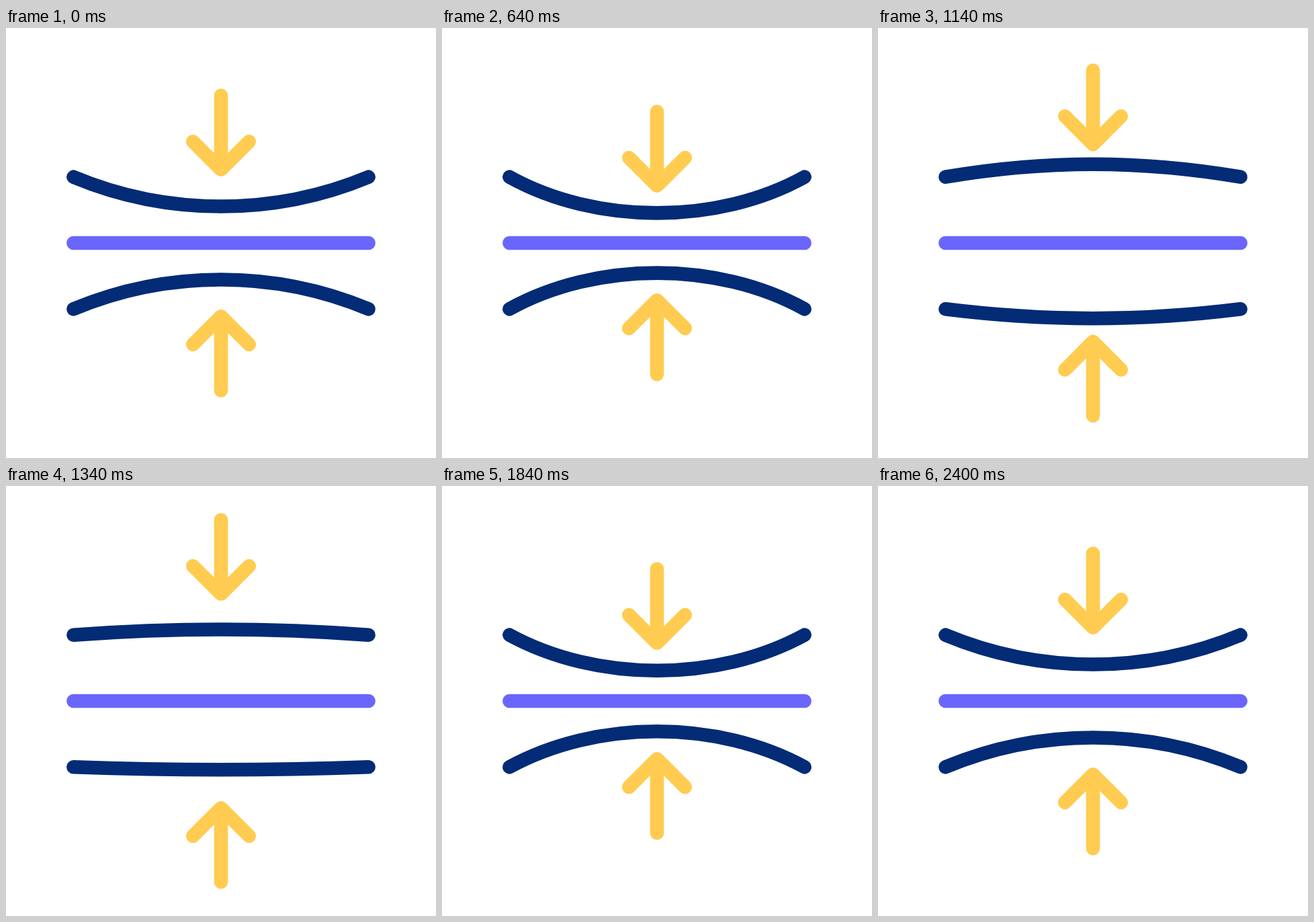
An HTML page with a canvas that plays this animation: 640 px wide and 640 px high, repeating every 3000 ms.

```html
<!DOCTYPE html>
<html lang="en">
<head>
<meta charset="utf-8">
<title>Compress and expand</title>
<style>
  html, body { margin: 0; width: 100%; height: 100%; overflow: hidden; background: #fff; }
  canvas { display: block; }
</style>
</head>
<body>
<canvas id="stage" width="640" height="640"></canvas>
<script>
const ctx = document.getElementById('stage').getContext('2d');
const LOOP = 3000;
const CENTER = 320, LEFT = 100.4, RIGHT = 539.6;
const NAVY = '#032b76', VIOLET = '#6a66fb', YELLOW = '#ffcc51';

// Each key is [time in ms, value]; values ease in and out between keys.
const arrowKeys = [[200, 0], [700, 25], [1300, -51], [1900, 25], [2400, 0]];

// Vertical and horizontal reach of the curve's control points.
const curveKeys = (lowest) => ({
  rise: [[200, 58.4], [680, 71.8], [1200, lowest], [1720, 71.8], [2400, 58.4]],
  run: [[200, 140], [680, 129], [1200, 150], [1720, 129], [2400, 140]]
});
const upperCurve = curveKeys(-29);
const lowerCurve = curveKeys(-22);

const smooth = (u) => u * u * (3 - 2 * u);

function valueAt(keys, time) {
  if (time <= keys[0][0]) return keys[0][1];
  for (let i = 1; i < keys.length; i++) {
    const [start, from] = keys[i - 1];
    const [end, to] = keys[i];
    if (time < end) return from + (to - from) * smooth((time - start) / (end - start));
  }
  return keys[keys.length - 1][1];
}

function stroke(color, trace) {
  ctx.strokeStyle = color;
  ctx.beginPath();
  trace();
  ctx.stroke();
}

function drawCurve(keys, time) {
  const y = 221.7;
  const controlY = y + valueAt(keys.rise, time);
  const run = valueAt(keys.run, time);
  stroke(NAVY, () => {
    ctx.moveTo(LEFT, y);
    ctx.bezierCurveTo(LEFT + run, controlY, RIGHT - run, controlY, RIGHT, y);
  });
}

function drawArrow(time) {
  const shift = valueAt(arrowKeys, time);
  const tip = 210.8 + shift, wing = 41.8;
  stroke(YELLOW, () => {
    ctx.moveTo(CENTER, 100.6 + shift);
    ctx.lineTo(CENTER, tip);
    ctx.moveTo(CENTER - wing, tip - wing);
    ctx.lineTo(CENTER, tip);
    ctx.lineTo(CENTER + wing, tip - wing);
  });
}

function drawHalf(curve, time, flipped) {
  ctx.save();
  if (flipped) {
    ctx.translate(0, 640);
    ctx.scale(1, -1);
  }
  drawCurve(curve, time);
  drawArrow(time);
  ctx.restore();
}

function draw(now) {
  const time = now % LOOP;
  ctx.fillStyle = '#fff';
  ctx.fillRect(0, 0, 640, 640);
  ctx.lineWidth = 20.6;
  ctx.lineCap = ctx.lineJoin = 'round';
  stroke(VIOLET, () => {
    ctx.moveTo(LEFT, CENTER);
    ctx.lineTo(RIGHT, CENTER);
  });
  drawHalf(upperCurve, time, false);
  drawHalf(lowerCurve, time, true);
}

let began;
function tick(now) {
  began ??= now;
  draw(now - began);
  requestAnimationFrame(tick);
}
draw(0);
requestAnimationFrame(tick);
</script>
</body>
</html>
```
